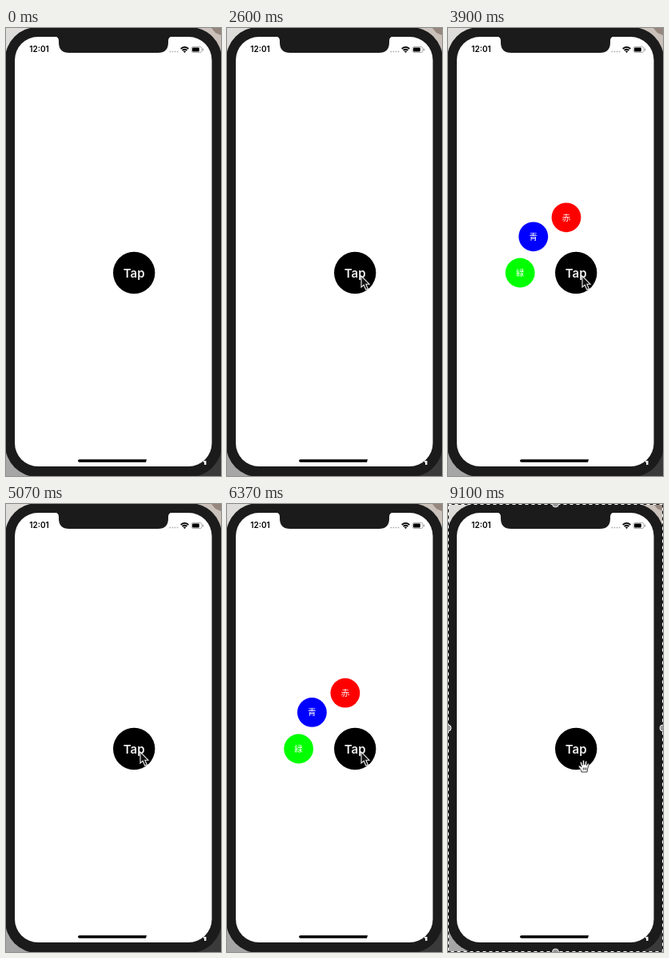
An HTML page for the animation above (9230 ms loop, 269x560 px).

```html
<!DOCTYPE html>
<html lang="en">
<head>
<meta charset="utf-8">
<title>Expanding tap menu</title>
<style>
  html, body { margin: 0; width: 100%; height: 100%; overflow: hidden; }
  svg { display: block; width: 269px; height: 560px; }
  text { font-family: Inter, Roboto, sans-serif; text-anchor: middle; }
  .item text { font: 300 10.5px "Noto Sans CJK JP", "Noto Sans CJK", sans-serif; fill: #fff; }
</style>
</head>
<body>
<svg viewBox="0 0 269 560">
  <defs>
    <linearGradient id="desk" x2="0" y2="1">
      <stop offset="0" stop-color="#deddda"/>
      <stop offset="1" stop-color="#a5a5a5"/>
    </linearGradient>
  </defs>

  <!-- desktop and phone -->
  <rect width="269" height="560" fill="url(#desk)"/>
  <path d="M236 0H269V40Z" fill="#c9c1ba"/>
  <path d="M257 0H269V9L262 6Z" fill="#96877e"/>
  <path d="M225 560L269 515V560Z" fill="#3a3a3a"/>
  <rect x="-1" y="-1" width="271" height="562" rx="40" fill="#1b1b1b"/>
  <rect x="11" y="11" width="246.500" height="537" rx="29" fill="#fff"/>
  <path d="M61 10.500Q66 11 66 16V18Q66 31 79 31H190Q203 31 203 18V16Q203 11 208 10.500Z" fill="#1b1b1b"/>
  <path d="M247 541H250.500V546H248V543H247Z" fill="#f4f4f4"/>

  <!-- status bar -->
  <text x="41.500" y="30.300" font-size="10" font-weight="600">12:01</text>
  <path d="M204.500 29.500H216" stroke="#aaa" stroke-width="1.600" stroke-dasharray="1.600 1.500"/>
  <g fill="none" stroke="#000" stroke-width="1.700">
    <path d="M218.700 26Q223.500 21.600 228.300 26"/>
    <path d="M220.600 28Q223.500 25.500 226.400 28"/>
  </g>
  <path d="M221.700 29.200Q223.500 27.800 225.300 29.200L223.500 31Z"/>
  <rect x="232" y="23.500" width="13" height="7" rx="2" fill="#fff" stroke="#999" stroke-width=".8"/>
  <rect x="233" y="24.500" width="8.800" height="5" rx="1"/>
  <path d="M246.500 25.700V28.500" stroke="#999"/>
  <path d="M176 539.300H92Q90 539.300 90 541T92 542.700H175Z"/>

  <!-- menu -->
  <g id="menu"></g>
  <circle cx="160.200" cy="306" r="26.200"/>
  <text x="160.200" y="311.600" font-size="15" font-weight="600" fill="#f2f2f2">Tap</text>

  <!-- pointers, drawn around their hot spots -->
  <path id="arrow" d="M0 0V14L3.200 11.200L5.700 17L8.300 15.900L5.900 10.200H10Z"
        fill="#111" stroke="#f4f4f4" stroke-width="1.100"/>
  <path id="hand" transform="translate(170 327.500)" fill="#fff" stroke="#222" stroke-width=".9" stroke-linejoin="round"
        d="M-3 7.500Q-3 5-5.500 2.500Q-7.500 0-6-.5T-3 1.500L-4.600-4Q-4.500-6-2.800-5L-1.500-1.200L-1.600-6.500Q-.3-8 .5-6.500L.8-1.400L2-6Q3.300-7 3.900-5.500L3.200-.8L4.900-3.500Q6.500-4 6.300-2Q5 2 4.600 4L4 7.500ZM-.7 2V5M1.200 2V5M3 2V5"/>

  <!-- selection -->
  <g id="selection">
    <rect x=".5" y=".5" width="268" height="559" fill="none" stroke="#111"/>
    <rect x=".5" y=".5" width="268" height="559" fill="none" stroke="#fff" stroke-dasharray="4 4"/>
    <g fill="#999" stroke="#eee">
      <circle cx="134.500" cy="0" r="4"/>
      <circle cx="134.500" cy="560" r="4"/>
      <circle cx="0" cy="280" r="4"/>
      <circle cx="269" cy="280" r="4"/>
    </g>
  </g>
</svg>

<script>
const LOOP = 9230, STEP = 130;
const HOME = { x: 160.2, y: 306 };
const ITEMS = [
  { label: "赤", color: "#f00", x: 148, y: 236.8 },
  { label: "青", color: "#00f", x: 106.8, y: 260.8 },
  { label: "緑", color: "#0f0", x: 90.2, y: 306 },
];
const OPENINGS = [
  { open: 2722, close: 4385 },
  { open: 5800, close: 7410 },
];
const CLOSE_TIME = 130;
// Pointer path: time, x, y
const PATH = [
  [910, 285, 318], [1040, 262, 322], [1430, 206, 325], [1820, 172, 316],
  [1950, 168, 311], [2080, 167.5, 309.5], [2210, 168, 310],
  [7800, 168, 310], [7930, 168, 322], [8060, 168, 326],
];

const byId = id => document.getElementById(id);
const show = (id, on) => byId(id).setAttribute("visibility", on ? "visible" : "hidden");
const moveTo = (node, x, y) => node.setAttribute("transform", `translate(${x} ${y})`);

byId("menu").innerHTML = ITEMS.map(({ label, color }) =>
  `<g class="item"><circle r="18.400" fill="${color}"/><text y="3.900">${label}</text></g>`).join("");
const nodes = [...document.querySelectorAll(".item")];

function spring(seconds) {
  const frequency = 19, damping = 0.45;
  const root = Math.sqrt(1 - damping ** 2), phase = frequency * root * seconds;
  return 1 - Math.exp(-damping * frequency * seconds) *
    (Math.cos(phase) + damping / root * Math.sin(phase));
}

const easeInOut = p => p < 0.5 ? 2 * p * p : 1 - 2 * (1 - p) ** 2;

function menuSpread(t) {
  const span = OPENINGS.find(s => t >= s.open && t < s.close + CLOSE_TIME);
  if (!span) return 0;
  return t < span.close
    ? spring((t - span.open) / 1000)
    : 1 - easeInOut((t - span.close) / CLOSE_TIME);
}

function pointerAt(t) {
  const next = PATH.findIndex(point => point[0] > t);
  if (next < 0) return PATH.at(-1).slice(1);
  if (next === 0) return PATH[0].slice(1);
  const [t0, x0, y0] = PATH[next - 1], [t1, x1, y1] = PATH[next];
  const p = (t - t0) / (t1 - t0);
  return [x0 + (x1 - x0) * p, y0 + (y1 - y0) * p];
}

function draw(now) {
  const t = Math.floor((now % LOOP) / STEP) * STEP;
  const spread = menuSpread(t);
  ITEMS.forEach((item, i) => moveTo(nodes[i],
    HOME.x + (item.x - HOME.x) * spread,
    HOME.y + (item.y - HOME.y) * spread));

  const selecting = t >= 8970;
  moveTo(byId("arrow"), ...pointerAt(t));
  show("arrow", t >= 1040 && !selecting);
  show("hand", selecting);
  show("selection", selecting);
}

const start = performance.now();
function tick() {
  draw(performance.now() - start);
  requestAnimationFrame(tick);
}
tick();
</script>
</body>
</html>
```
